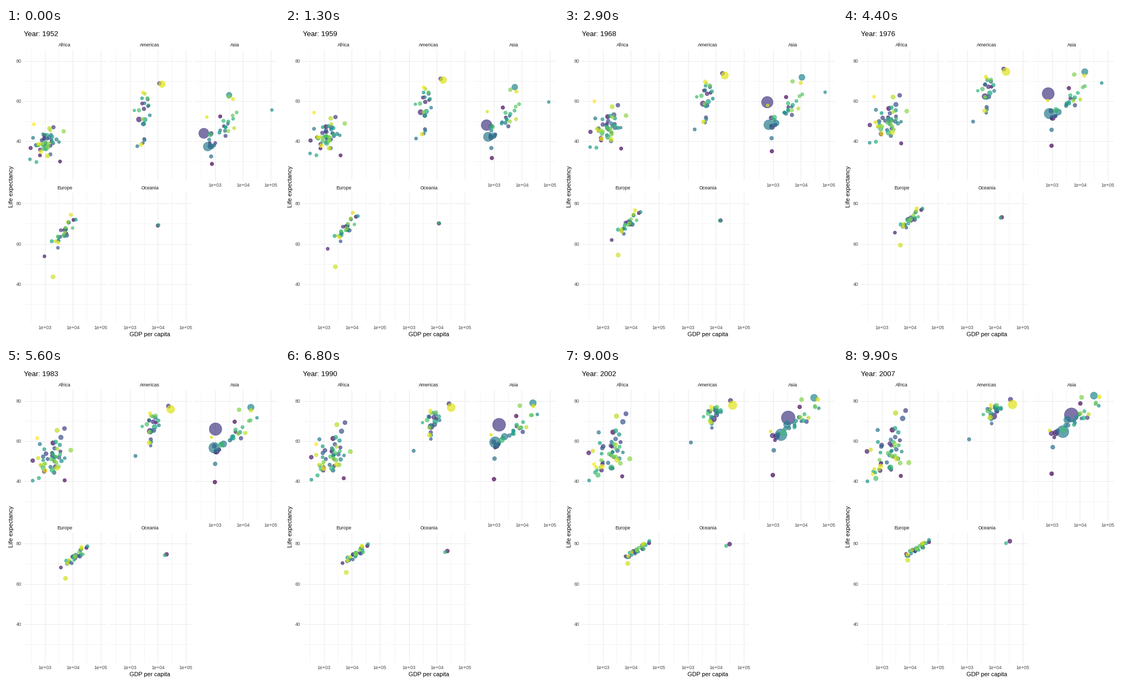
Recreate the animation shown at these times as a matplotlib script. Size 504 px wide and 576 px high, loop 10000 ms.

```python
import numpy as np
import matplotlib.pyplot as plt
from matplotlib.animation import FuncAnimation

W, H, FRAMES = 504, 576, 100
FIRST, LAST = 1952, 2007
plt.rcParams["font.family"] = "Liberation Sans"
rng = np.random.default_rng(12)

PANELS = {"Africa": (0, 0), "Americas": (1, 0), "Asia": (2, 0),
          "Europe": (0, 1), "Oceania": (1, 1)}

# Large or outlying dots: hue rank, population, first gdp and life, last gdp and life
KEY_DOTS = {
    "Africa": [(4, 4, 3521, 30, 4797, 42.7), (39, 22, 1419, 41.9, 5581, 71.3),
               (95, 33, 1077, 36.3, 2014, 46.9), (118, 14, 4725, 45, 9270, 49.3),
               (142, 3, 407, 48.5, 470, 43.5)],
    "Americas": [(15, 57, 2109, 50.9, 9066, 72.4), (21, 15, 11367, 68.8, 36319, 80.7),
                 (54, 3, 1840, 37.6, 1202, 60.9), (83, 30, 3478, 50.8, 11978, 76.2),
                 (135, 158, 13990, 68.4, 42952, 78.2)],
    "Asia": [(1, 8, 779, 28.8, 975, 43.8), (9, 47, 684, 37.5, 1391, 64.1),
             (25, 556, 400, 44, 4959, 73), (59, 372, 547, 37.4, 2452, 64.7),
             (60, 82, 750, 37.5, 3541, 70.6), (67, 86, 3217, 63, 31656, 82.6),
             (72, 1, 108382, 55.6, 47307, 77.6), (98, 41, 685, 43.4, 2606, 65.5)],
    "Europe": [(13, 3, 974, 53.8, 7446, 74.9), (132, 22, 1969, 43.6, 8458, 71.8)],
    "Oceania": [(6, 9, 10040, 69.1, 34435, 81.2), (92, 2, 10557, 69.4, 25185, 80.2)]}

# Stops on the way: year, gdp, life
STOPS = {25: [(1959, 541, 47.8), (1968, 625, 59.4), (1977, 741, 64), (1990, 1540, 68.2)],
         59: [(1977, 813, 54.2), (1990, 1110, 59.5)],
         67: [(1968, 10800, 71.8), (1990, 25000, 79)],
         72: [(1977, 59265, 69.3), (1982, 31354, 71.3)]}

# Crowds: count, then for both ends log10 gdp, its spread, life, slope, noise
CROWDS = {"Africa": (47, (2.99, .26, 39, 1.5, 3.8), (3.2, .4, 54.5, 3.5, 7.5)),
          "Americas": (20, (3.5, .17, 53, 4, 6.5), (3.9, .21, 74.3, 1.3, 2.2)),
          "Asia": (25, (3.2, .32, 46.5, 4, 6), (3.75, .48, 70.5, 5, 3.2)),
          "Europe": (28, (3.69, .22, 65.6, 4, 2.2), (4.33, .27, 77.8, 2.4, .9))}

# Bulge of the path halfway: life, log10 gdp
BULGE = {"Africa": (3.4, .09), "Americas": (1.9, .04), "Asia": (2.4, .05),
         "Europe": (1.5, .09), "Oceania": (-1.3, .01)}

years = np.linspace(FIRST, LAST, FRAMES)
part = (years - FIRST) / (LAST - FIRST)


def px(col, log_gdp):
    return 71.6 + 157.1 * col + 51.6 * (log_gdp - 3)


def py(row, life):
    return 60.7 + 263.5 * row + 3.715 * (80 - life)


def bulged(name, g0, l0, g1, l1):
    """Straight line between both ends plus the continent's bulge."""
    gain = l1 - l0
    scale = 1
    if name == "Africa":
        scale += 0.25 * max(0, 10 - gain)
    elif name == "Europe":
        scale = gain / 13
    arc = np.sin(np.pi * part)
    life, gdp = BULGE[name]
    return g0 + (g1 - g0) * part + gdp * arc, l0 + gain * part + scale * life * arc


def through(points):
    t, gdp, life = np.array(points, float).T
    return np.interp(years, t, np.log10(gdp)), np.interp(years, t, life)


def crowd(n, first, last):
    """Dots scattered round a life-to-income line that mostly keep their rank."""
    for k in range(n):
        z, u = rng.normal(size=2).clip(-2, 2)
        z2, u2 = 0.8 * np.array((z, u)) + 0.6 * rng.normal(size=2).clip(-1.5, 1.5)
        ends = []
        for (g, spread, life, slope, noise), a, b in ((first, z, u), (last, z2, u2)):
            ends += [np.clip(g + spread * a, 2.47, 4.69),
                     min(life + slope * a + noise * b, 82)]
        pop = np.exp(rng.normal(1.5, 0.9)).clip(0.3, 35)
        yield 2 + (k + rng.random()) * 139 / n, pop, ends


dots = []


def add(name, hue, pop, path):
    col, row = PANELS[name]
    grown = pop * (1.25 if name == "Europe" else 2.3)
    size = 2 + 10 * np.sqrt((pop + (grown - pop) * part) / 1319)
    dots.append((hue, px(col, path[0]), py(row, path[1]), 0.75 * (size * 2.845 + 0.945)))


for name, rows in KEY_DOTS.items():
    for hue, pop, g0, l0, g1, l1 in rows:
        if hue in STOPS:
            path = through([(FIRST, g0, l0), *STOPS[hue], (LAST, g1, l1)])
        else:
            path = bulged(name, np.log10(g0), l0, np.log10(g1), l1)
        add(name, hue, pop, path)
for name, spec in CROWDS.items():
    for hue, pop, ends in crowd(*spec):
        add(name, hue, pop, bulged(name, *ends))
dots.sort(key=lambda d: d[0])
hues, xs, ys, ds = (np.array(v) for v in zip(*dots))

fig = plt.figure(figsize=(W / 72, H / 72), dpi=72, facecolor="white")
ax = fig.add_axes((0, 0, 1, 1))
ax.set(xlim=(0, W), ylim=(H, 0))
ax.axis("off")


def label(x, y, s, size=8.8, color="#4d4d4d", ha="center", **kw):
    return ax.text(x, y, s, size=size, color=color, ha=ha, va="baseline", **kw)


for name, (col, row) in PANELS.items():
    left, right = px(col, 2.246), px(col, 5.19)
    top, bottom = py(row, 85.5), py(row, 20.7)
    for step, width in ((0.5, 0.53), (0, 1.07)):
        style = dict(color="#ebebeb", lw=width, zorder=1)
        ax.vlines([px(col, e - step) for e in (3, 4, 5)], top, bottom, **style)
        ax.hlines([py(row, v - 20 * step) for v in (40, 60, 80)], left, right, **style)
    label((left + right) / 2, top - 6, name, color="#1a1a1a")
    if name in ("Asia", "Europe", "Oceania"):
        for e in (3, 4, 5):
            label(px(col, e), bottom + 12, f"1e+0{e}")
    if col == 0:
        for v in (40, 60, 80):
            label(28.4, py(row, v) + 3.2, v, ha="right")

label(265.5, 569, "GDP per capita", 11, "black")
label(13.5, 293, "Life expectancy", 11, "black", rotation=90, rotation_mode="anchor")
title = label(33, 15, "", 13.2, "black", ha="left")

colors = plt.get_cmap("viridis")((hues - 1) / 141)
colors[:, 3] = 0.7
cloud = ax.scatter(xs[:, 0], ys[:, 0], s=ds[:, 0] ** 2, c=colors,
                   edgecolors=colors, linewidths=0.7, zorder=3)


def draw(i):
    cloud.set_offsets(np.column_stack((xs[:, i], ys[:, i])))
    cloud.set_sizes(ds[:, i] ** 2)
    title.set_text(f"Year: {years[i]:.0f}")
    return cloud, title


anim = FuncAnimation(fig, draw, frames=FRAMES, interval=100, repeat=True)
plt.show()
```
